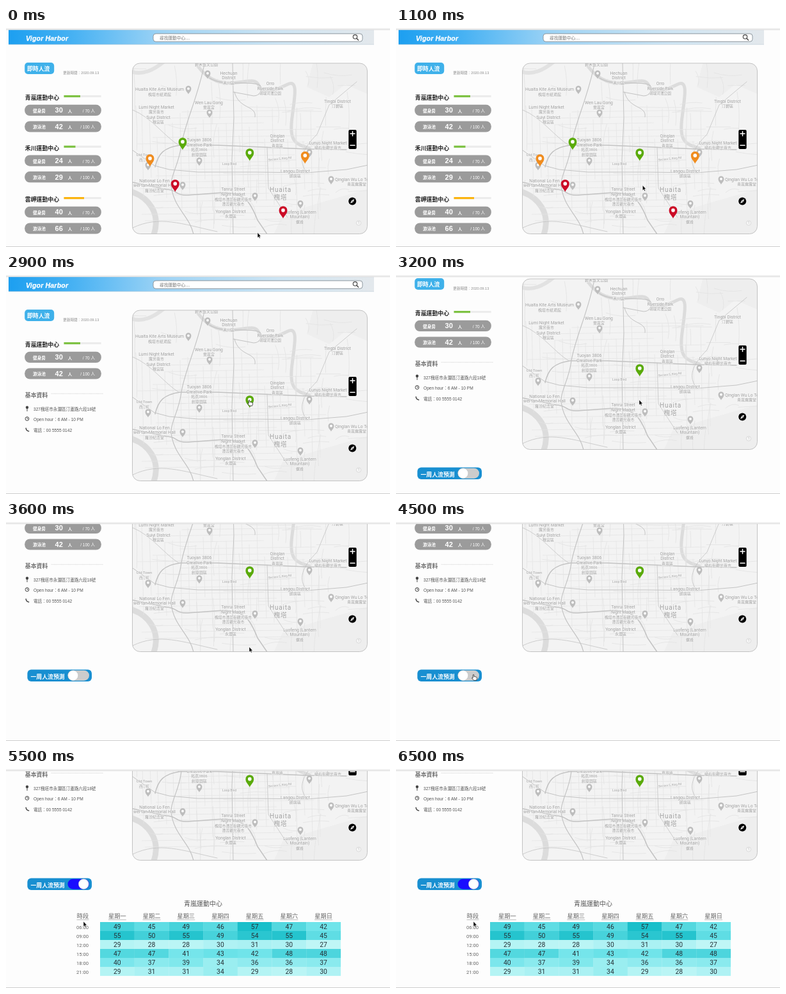
Animation of 600x342 px, one loop 6.6 s. Source, as an HTML page:

```html
<!DOCTYPE html>
<html lang="zh-Hant">
<head>
<meta charset="utf-8">
<title>Gym crowd dashboard</title>
<style>
  html, body { margin: 0; width: 100%; height: 100%; overflow: hidden; background: #fdfdfd; }
  svg { display: block; width: 600px; height: 342px; }
  text { font-family: "Liberation Sans", "Noto Sans CJK TC", "Noto Sans CJK JP", "Noto Sans CJK", sans-serif; }
  .map text, .table text { font-family: Roboto, "Noto Sans CJK TC", "Noto Sans CJK JP", "Noto Sans CJK", sans-serif; }
  .line { fill: none; stroke-linecap: round; stroke-linejoin: round; }
</style>
</head>
<body>
<svg id="stage" viewBox="0 0 600 342">
  <defs>
    <linearGradient id="bar">
      <stop offset="0" stop-color="#1c9ff0"/>
      <stop offset=".18" stop-color="#48b2f3"/>
      <stop offset=".42" stop-color="#9dd3f5"/>
      <stop offset=".75" stop-color="#cfe5f3"/>
      <stop offset="1" stop-color="#e3e8ec"/>
    </linearGradient>
    <clipPath id="frame"><rect x="197.5" y="55" width="367" height="266.5" rx="12"/></clipPath>
  </defs>
</svg>
<script>
const LOOP = 6600, STEP = 100;
const stage = document.getElementById("stage");

function add(parent, tag, attrs = {}) {
  const el = document.createElementNS("http://www.w3.org/2000/svg", tag);
  for (const key in attrs) el.setAttribute(key, attrs[key]);
  return parent.appendChild(el);
}
const group = (parent, attrs) => add(parent, "g", attrs);
const box = (parent, x, y, width, height, fill, rx = 0, more = {}) =>
  add(parent, "rect", { x, y, width, height, fill, rx, ...more });
const line = (parent, d, stroke, width, more = {}) =>
  add(parent, "path", { d, stroke, "stroke-width": width, class: "line", ...more });
// y is the vertical middle of the text
function text(parent, x, y, str, size, fill, more = {}) {
  const el = add(parent, "text", { x, y: y + size * 0.37, "font-size": size, fill, ...more });
  el.textContent = str;
  return el;
}
const BOLD = { "font-weight": 700 }, MID = { "text-anchor": "middle" };

const PIN = "M0 10.5C-1.2 6.5-6.2 4-6.2-1.8A6.2 6.2 0 0 1 6.2-1.8C6.2 4 1.2 6.5 0 10.5Z";
function pin(parent, x, y, fill, scale = 1.04) {
  const g = group(parent, { transform: `translate(${x} ${y}) scale(${scale})` });
  add(g, "path", { d: PIN, fill });
  add(g, "circle", { cy: -1.8, r: 2.7, fill: "#fff" });
  return g;
}

const page = group(stage);
drawHeader(page);
const list = group(page), detail = group(page);
drawSidebar();
const others = drawMap(page);
const toggle = drawToggle(detail);
const table = drawTable(detail);

// window edges stay above the scrolling page
box(stage, 0, 0, 600, 3, "#f1f1f1");
box(stage, 0, 2.4, 600, 0.8, "#d4d4d4");
box(stage, 0, 341, 600, 1, "#cdcdcd");

const arrow = add(stage, "path", {
  d: "M0 0V8L1.8 6.4L3 9.1L4.3 8.5L3.1 5.9H5.4Z", fill: "#000", stroke: "#fff", "stroke-width": 0.5
});
const hand = add(stage, "path", {
  d: "M0 0.8C0-0.4 1.7-0.4 1.7 0.8V3.2C2.6 2.8 3.2 3 3.4 3.5C4.2 3.2 4.8 3.5 5 4C5.8 3.8 6.3 4.2 6.3 5V6.6L5.4 9H1.3L-1.5 5.7C-1.8 4.8-0.8 4.5 0 5.3Z",
  fill: "#fff", stroke: "#222", "stroke-width": 0.8
});

function drawHeader(g) {
  box(g, 4, 3, 571, 23, "url(#bar)");
  box(g, 4, 25.5, 571, 0.7, "#c5d3dc");
  text(g, 31, 15.8, "Vigor Harbor", 10.6, "#fff",
    { "font-weight": 900, "font-style": "italic", "letter-spacing": 0.15, stroke: "#fff", "stroke-width": 0.25 });
  box(g, 230, 8.9, 327, 12.4, "#fff", 4, { stroke: "#8d979e", "stroke-width": 1 });
  text(g, 240, 15.2, "尋找運動中心....", 6.7, "#777");
  add(g, "circle", { cx: 545.5, cy: 13.8, r: 3.2, fill: "none", stroke: "#444", "stroke-width": 1.1 });
  line(g, "M548 16.3L550.6 18.9", "#444", 1.4);
}

function center(g, y, name, fill, width, gym, pool) {
  text(g, 29.8, y + 0.8, name, 8.9, "#222", BOLD);
  box(g, 90.5, y - 3, 58, 3.2, "#ececec");
  box(g, 90.5, y - 3, width, 3.2, fill);
  [["健身房", gym, 70], ["游泳池", pool, 100]].forEach(([label, count, max], i) => {
    const mid = y + 20.4 + i * 25.6;
    box(g, 29.2, mid - 8.6, 119.6, 17.2, "#9b9b9b", 8);
    text(g, 42, mid + 1, label, 6.7, "#fff", BOLD);
    text(g, 82.7, mid - 0.1, count, 11, "#fff", { ...BOLD, ...MID });
    text(g, 100, mid + 1, "人", 6.4, "#fff", { ...BOLD, ...MID });
    text(g, 139, mid + 1, `/ ${max} 人`, 6.5, "#fff", { "text-anchor": "end" });
  });
}

function drawSidebar() {
  box(page, 29.2, 54, 46, 18, "#3fb1ea", 5);
  text(page, 33, 63.8, "即時人流", 8.9, "#fff", BOLD);
  text(page, 89.3, 70.4, "更新時間：2020.09.13", 5.6, "#8c8c8c");
  center(page, 108, "青嵐運動中心", "#7dc242", 25.5, 30, 42);
  center(list, 186.7, "禾川運動中心", "#7dc242", 18, 24, 29);
  center(list, 267, "雲岬運動中心", "#fbb40f", 31.5, 40, 66);

  text(detail, 29.8, 187.6, "基本資料", 8.9, "#707070", BOLD);
  line(detail, "M71 185.3H152", "#d8d8d8", 0.8, { "stroke-dasharray": "1 1.2" });
  ["327槐塔市永瀾區汀蘆路六段18號", "Open hour：6 AM - 10 PM", "電話：00 5555 0142"]
    .forEach((str, i) => text(detail, 43, 209.3 + i * 16.7, str, 6.6, "#555"));
  add(detail, "circle", { cx: 33, cy: 206.8, r: 2.2, fill: "#444" });
  line(detail, "M33 208V212.5", "#444", 1);
  add(detail, "circle", { cx: 33, cy: 224.5, r: 2.9, fill: "none", stroke: "#444", "stroke-width": 1 });
  line(detail, "M33 222.8V224.6H34.4", "#444", 0.8);
  line(detail, "M31.2 239.2C31.4 242 33 243.6 35.6 243.9", "#444", 1.5);
}

function drawMap(parent) {
  const map = group(parent, { class: "map" });
  const g = group(map, { "clip-path": "url(#frame)" });
  box(g, 197, 54, 368, 268, "#f3f3f3");

  // hills and water
  add(g, "path", { d: "M415 330L432 292L480 276L570 250V330Z", fill: "#eeeeee" });
  add(g, "path", { d: "M480 52H570V105L530 88L505 108L470 92Z", fill: "#eeeeee" });
  line(g, "M190 254C222 262 246 290 228 330", "#dcdcdc", 9);
  line(g, "M190 66C212 76 232 66 252 48", "#e2e2e2", 6);
  line(g, "M300 60C318 84 338 88 362 85S392 80 396 92S420 98 440 88S448 120 446 150S456 182 474 188", "#dcdcdc", 5);

  // side streets
  let seed = 11;
  const rnd = () => (seed = (seed * 16807) % 2147483647) / 2147483647;
  for (let x = 212; x < 500; x += 12) line(g, `M${x} ${120 + rnd() * 60}L${x + 3} ${230 + rnd() * 75}`, "#e5e5e5", 0.8);
  for (let y = 128; y < 305; y += 10) line(g, `M${205 + rnd() * 70} ${y + 3}L${400 + rnd() * 100} ${y}`, "#e5e5e5", 0.8);
  for (let i = 0; i < 80; i++) {
    const x = 197 + rnd() * 340, y = 58 + rnd() * 255, len = 20 + rnd() * 50, bend = (rnd() - 0.5) * 18;
    line(g, i % 2 ? `M${x} ${y}q${len / 2} ${bend} ${len} ${bend / 2}`
                  : `M${x} ${y - 20}q${bend} ${len / 2} ${bend / 2} ${len}`, "#e3e3e3", 0.8);
  }

  // main roads
  [
    ["M318 78C340 92 372 82 394 88C404 92 398 106 387 106L355 100", 1.2],
    ["M357 100C364 128 392 120 389 139", 1],
    ["M198 191L232 215L255 221L300 225H390L470 226L532 221L566 214", 1],
    ["M233 217C238 196 246 187 272 183L330 183L400 186L470 189L532 190", 1.5],
    ["M310 56C301 105 279 150 274 183C270 214 257 230 258 246C262 282 286 292 293 322", 1.2],
    ["M198 241L250 252C268 252 264 262 284 261L340 257C374 258 382 272 393 300L408 322", 1.5],
    ["M354 55L356 140L353 205L355 322", 1],
    ["M198 128C228 140 248 170 270 183", 0.8],
    ["M470 226C456 208 462 190 486 166L505 120L548 84", 0.8],
    ["M408 186L410 250L440 296", 0.8],
    ["M198 312C240 292 274 306 330 318", 0.8]
  ].forEach(([d, width]) => line(g, d, "#c3c3c3", width));
  add(g, "circle", { cx: 551, cy: 304.5, r: 3.6, fill: "#f7f7f7", stroke: "#c8c8c8", "stroke-width": 0.6 });
  text(g, 551, 304.5, "1", 4.5, "#aaa", MID);

  [[315, 72], [285, 96], [318, 133], [302, 208], [389, 263], [508, 237],
   [276, 246], [460, 275], [222, 215], [474, 195]]
    .forEach(([x, y]) => pin(g, x, y, "#bdbdbd", 0.72));

  const isLatin = str => /[a-z]/i.test(str);
  const label = (x, y, str, size = 6.8, more = {}) => str.split("|").forEach((row, i) =>
    text(g, x, y + i * 7.7, row, isLatin(row) ? size : size * 0.88, "#a0a0a0",
      { ...MID, stroke: "#f6f6f6", "stroke-width": 1, "paint-order": "stroke", ...more }));
  label(313, 57, "碧禾藝文公園");
  label(348, 70, "Hechuan|District|禾川區");
  label(240, 95, "Huaita Kite Arts Museum");
  label(240, 104, "槐塔市紙鳶館");
  label(317, 116, "Wen Lau Gong|雯嵐宮");
  label(235, 123, "Lumi Night Market|露米夜市");
  label(238, 139, "Suiyi District|穗宜區");
  label(413, 87, "Orro|Riverside Park|翎堤河濱公園", 6.4);
  label(518, 114, "Tingbi District|汀碧區");
  label(302, 174.5, "Tuoyan 3806|Creative Park|拓燕3806|創意園區");
  label(424, 168, "Qinglan|District|青嵐區");
  label(503, 179, "Lunyo Night Market|綸右街觀光夜市");
  label(216, 198, "Old Town|西汀町", 6);
  label(349, 212, "Loop Blvd", 5);
  label(428, 204, "Section 5, Ring Rd", 4.6, { transform: "rotate(-6 428 204)" });
  label(452, 223, "Langqu District|朗渠區");
  label(514, 236, "Qinglan Wu Lo Temple", 6.8, { "text-anchor": "start" });
  label(548, 244, "青嵐霧露堂");
  label(232, 238, "National Lo Fen|wei-tan Memorial Hall|羅汾紀念堂");
  label(355, 252, "Tanrui Street|Night Market|槐塔市潭蕊街觀光夜市|潭蕊觀光夜市", 6.6);
  label(351, 286, "Yonglan District|永瀾區");
  label(429, 252, "Huaita", 10, { "letter-spacing": 0.8 });
  label(429, 264, "槐塔", 11, { "letter-spacing": 0.8 });
  label(459, 287, "Luofeng (Lantern|Mountain)|螺峰");

  box(map, 197.5, 55, 367, 266.5, "none", 12, { stroke: "#bdbdbd", "stroke-width": 0.9 });
  box(map, 535.3, 159, 12.4, 30, "#000", 2);
  line(map, "M538 165H545M541.5 161.5V168.5M538 183.3H545", "#fff", 1.5);
  add(map, "circle", { cx: 541.2, cy: 270.5, r: 6, fill: "#000" });
  add(map, "path", { d: "M544.4 267.3L542.4 271.7L538 273.7L540 269.3Z", fill: "#fff" });
  add(map, "circle", { cx: 541.2, cy: 270.5, r: 0.7, fill: "#000" });

  const rest = group(map);
  [[276, 179.5, "#5aaa0a"], [225, 205.5, "#f08c1e"], [467.3, 201, "#f08c1e"],
   [264.3, 245, "#cb0a26"], [433, 286.5, "#cb0a26"]].forEach(([x, y, fill]) => pin(rest, x, y, fill));
  pin(map, 380.8, 196.5, "#5aaa0a");
  return rest;
}

function drawToggle(g) {
  box(g, 33.4, 349.5, 100.6, 18.4, "#188fd1", 6);
  text(g, 38.5, 360.3, "一周人流預測", 8.9, "#fff", BOLD);
  return {
    track: box(g, 96.5, 350.7, 33.5, 16, "#ccc", 8),
    knob: add(g, "circle", { cy: 358.7, r: 8, fill: "#fff", stroke: "#aaa", "stroke-width": 0.4 })
  };
}

function heat(value) {
  const stops = [[191, 246, 246], [112, 228, 234], [25, 191, 202]];
  const pos = (value - 27) / 15, i = pos < 1 ? 0 : 1;
  return `rgb(${stops[i].map((c, k) => Math.round(c + (stops[i + 1][k] - c) * (pos - i)))})`;
}

function drawTable(parent) {
  const all = group(parent, { class: "table" }), head = group(all), rows = group(all);
  const colX = i => 147 + i * 53.7;
  text(head, 308, 389, "青嵐運動中心", 10, "#555", MID);
  const title = (x, str, half) => {
    text(head, x, 408.6, str, 9.2, "#666", MID);
    box(head, x - half, 414.2, half * 2, 0.6, "#999");
  };
  title(120, "時段", 9.5);
  [..."一二三四五六日"].forEach((day, i) => title(colX(i + 0.5), "星期" + day, 14));
  [
    ["06:00", 49, 45, 49, 46, 57, 47, 42],
    ["09:00", 55, 50, 55, 49, 54, 55, 45],
    ["12:00", 29, 28, 28, 30, 31, 30, 27],
    ["15:00", 47, 47, 41, 43, 42, 48, 48],
    ["18:00", 40, 37, 39, 34, 36, 36, 37],
    ["21:00", 29, 31, 31, 34, 29, 28, 30]
  ].forEach(([hour, ...values], r) => {
    const y = 418 + r * 14;
    text(rows, 119.5, y + 8.2, hour, 7.6, "#666", MID);
    values.forEach((value, i) => {
      box(rows, colX(i), y, 53.9, 14.1, heat(value));
      text(rows, colX(i + 0.5), y + 7.6, value, 10.4, "#263238", MID);
    });
  });
  return { all, head, rows };
}

// tables of [time, value...], eased between neighbours where asked
const smooth = u => u * u * (3 - 2 * u);
function track(keys, t, ease = u => u) {
  let i = 0;
  while (i < keys.length - 2 && t >= keys[i + 1][0]) i++;
  const [a, b] = [keys[i], keys[i + 1]];
  const u = ease(Math.min(1, Math.max(0, (t - a[0]) / (b[0] - a[0]))));
  return a.slice(1).map((v, k) => v + (b[k + 1] - v) * u);
}
const SCROLL = [[2900, 0], [3000, 8], [3100, 27], [3200, 49], [3400, 95], [3500, 112], [3600, 119],
  [5000, 119], [5100, 127], [5200, 145], [5300, 163], [5400, 174], [5500, 179]];
const MOUSE = [[200, 393, 319.5], [1800, 380, 195], [3700, 380, 195], [4400, 121, 238]];

const show = (el, on) => el.setAttribute("visibility", on ? "inherit" : "hidden");
const move = (el, x, y) => el.setAttribute("transform", `translate(${x} ${y})`);

function draw(t) {
  const picked = t >= 2500, on = t >= 4600, open = t >= 4800, settled = t >= 5000;
  move(page, 0, -track(SCROLL, t)[0]);
  show(list, !picked);
  show(others, !picked);
  show(detail, picked);
  toggle.track.setAttribute("fill", on ? "#1a0cff" : "#ccc");
  toggle.knob.setAttribute("cx", on ? 121.3 : 104.8);
  show(table.all, picked && open);
  show(table.head, picked && settled);
  move(table.rows, 0, settled ? 0 : -37);

  const [x, y] = track(MOUSE, t, smooth);
  const over = (t >= 1700 && t < 3000) || (t >= 4300 && t < 5100);
  show(hand, over);
  show(arrow, !over);
  move(hand, x - 0.8, y + 0.3);
  move(arrow, x, y);
}

const start = performance.now();
function tick() {
  const t = (performance.now() - start) % LOOP;
  draw(Math.floor(t / STEP) * STEP);
  requestAnimationFrame(tick);
}
tick();
</script>
</body>
</html>
```
